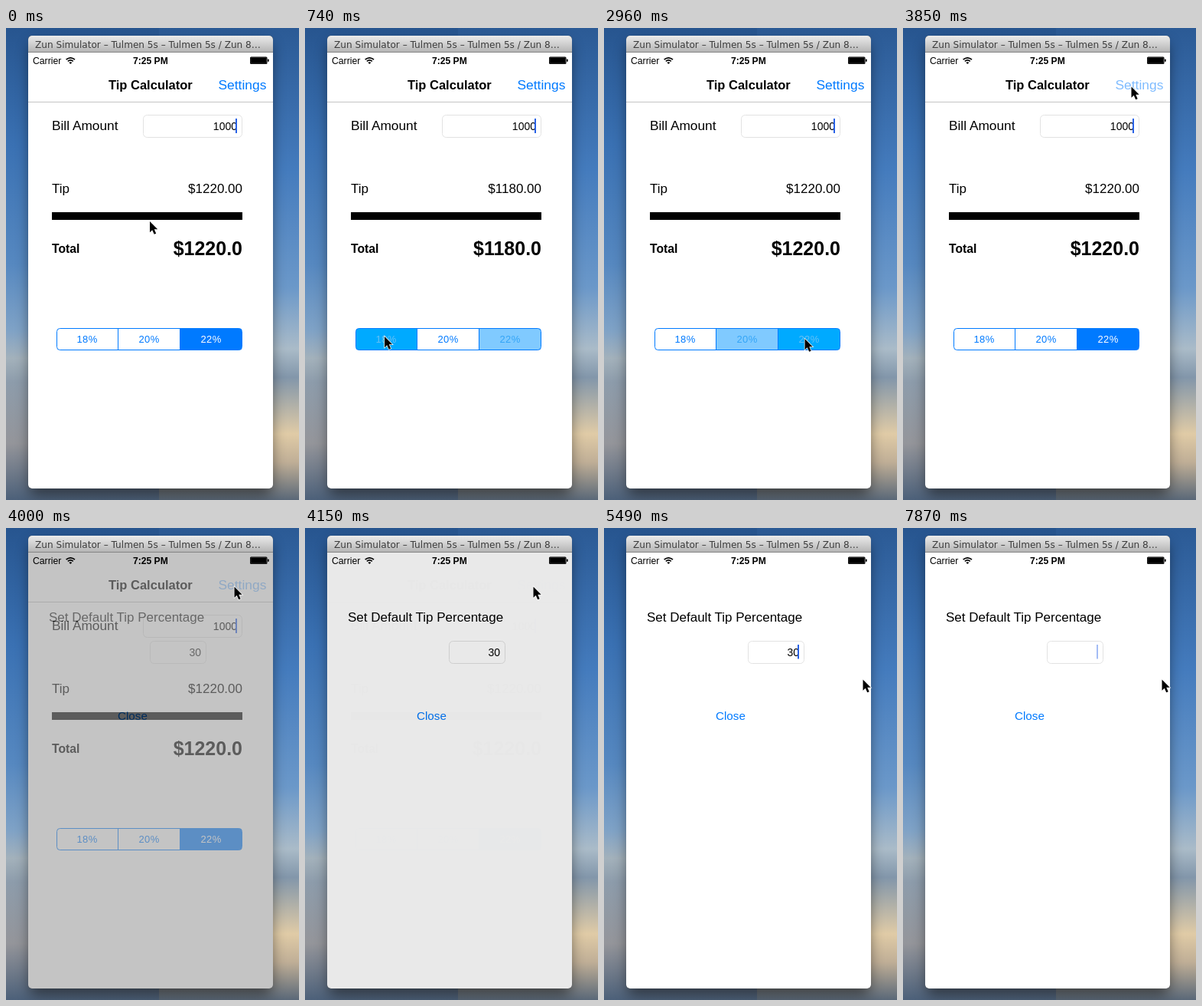
Recreate the animation shown at these times as an HTML page. Size 383 px wide and 615 px high, loop 8000 ms.

```html
<!DOCTYPE html>
<html lang="en">
<head>
<meta charset="utf-8">
<title>Tip Calculator</title>
<style>
html, body { margin: 0; width: 100%; height: 100%; overflow: hidden; background: #3f6fa8; }
svg { display: block; }
text { font: 17px "Liberation Sans", Arial, sans-serif; white-space: pre; }
.bold { font-weight: bold; }
.end { text-anchor: end; }
.link { fill: #007aff; }
.field { fill: #fff; stroke: #e2e2e2; }
.caret { fill: #2861e6; }
.small { font-size: 14px; }
.seg text { font-size: 13px; letter-spacing: .4px; text-anchor: middle; }
</style>
</head>
<body>
<svg width="383" height="615" viewBox="0 0 383 615">
  <defs>
    <linearGradient id="skyL" x2="0" y2="1">
      <stop offset="0" stop-color="#27558f"/>
      <stop offset=".25" stop-color="#3a71b3"/>
      <stop offset=".5" stop-color="#5688c0"/>
      <stop offset=".64" stop-color="#7fa2c6"/>
      <stop offset=".7" stop-color="#a3b1bb"/>
      <stop offset=".75" stop-color="#8d9cab"/>
      <stop offset=".88" stop-color="#94959a"/>
      <stop offset="1" stop-color="#4c6079"/>
    </linearGradient>
    <linearGradient id="skyR" x2="0" y2="1">
      <stop offset="0" stop-color="#2b5a95"/>
      <stop offset=".3" stop-color="#447bbd"/>
      <stop offset=".55" stop-color="#6b98c9"/>
      <stop offset=".68" stop-color="#aabbc8"/>
      <stop offset=".74" stop-color="#8296aa"/>
      <stop offset=".86" stop-color="#e0cba6"/>
      <stop offset=".92" stop-color="#bfae96"/>
      <stop offset="1" stop-color="#5a6878"/>
    </linearGradient>
    <linearGradient id="bar" x2="0" y2="1">
      <stop offset="0" stop-color="#ebebeb"/>
      <stop offset="1" stop-color="#b3b3b3"/>
    </linearGradient>
    <filter id="blur" x="-20%" y="-20%" width="140%" height="140%"><feGaussianBlur stdDeviation="9"/></filter>
    <clipPath id="frame"><rect x="29" y="10" width="320" height="590" rx="5"/></clipPath>
    <clipPath id="pill"><rect x="66.5" y="391.5" width="242" height="28" rx="4"/></clipPath>
  </defs>

  <rect width="200" height="615" fill="url(#skyL)"/>
  <rect x="200" width="183" height="615" fill="url(#skyR)"/>
  <rect x="31" y="20" width="316" height="588" rx="6" opacity=".5" filter="url(#blur)"/>

  <g clip-path="url(#frame)">
    <rect x="29" y="10" width="320" height="590"/>
    <rect x="29" y="10" width="320" height="22" fill="url(#bar)"/>
    <rect x="29" y="31" width="320" height="1" fill="#858585"/>
    <text x="38" y="25.5" fill="#3c3c3c" style="font:12.1px 'DejaVu Sans',sans-serif">Zun Simulator – Tulmen 5s – Tulmen 5s / Zun 8…</text>

    <g id="main">
      <rect x="29" y="32" width="320" height="568" fill="#fff"/>
      <rect x="29" y="96" width="320" height="1" fill="#c4c4c4"/>
      <text class="bold" x="134" y="80" style="font-size:16.5px">Tip Calculator</text>
      <text id="settings" class="link" x="277.5" y="80" style="font-size:17.4px">Settings</text>
      <text x="60" y="133" style="font-size:17.3px">Bill Amount</text>
      <rect class="field" x="179.5" y="113.5" width="129" height="29" rx="5"/>
      <text class="end small" x="302" y="133">1000</text>
      <rect id="caret1" class="caret" x="300" y="118" width="2" height="19"/>
      <text x="60" y="215">Tip</text>
      <text id="tip" class="end" x="309" y="215"></text>
      <rect x="60" y="240" width="249" height="10"/>
      <text class="bold" x="60" y="293" style="font-size:15.7px">Total</text>
      <text id="total" class="end bold" x="309" y="296" style="font-size:25px"></text>
      <g class="seg">
        <g id="segs" clip-path="url(#pill)"></g>
        <path d="M146.5 392v27M227.5 392v27" stroke="#007aff"/>
        <rect x="66.5" y="391.5" width="242" height="28" rx="4" fill="none" stroke="#007aff"/>
      </g>
    </g>

    <g id="prefs">
      <rect x="29" y="32" width="320" height="568" fill="#fff"/>
      <text x="56" y="122">Set Default Tip Percentage</text>
      <rect class="field" x="188.5" y="147.5" width="73" height="29" rx="5"/>
      <text id="percent" class="end small" x="255" y="167"></text>
      <rect id="caret2" class="caret" x="253" y="152" width="2" height="18.5"/>
      <text class="link" x="146" y="250" style="font-size:15.2px">Close</text>
    </g>

    <text x="35" y="46.5" style="font-size:12.2px">Carrier</text>
    <g fill="none" stroke="#000" stroke-width="1.7">
      <path d="M78.6 41.2q5.7-4.8 11.4 0M80.8 43.4q3.5-2.9 7 0"/>
      <path d="M84.3 47l-2-2q2-1.6 4 0z" fill="#000" stroke="none"/>
    </g>
    <text class="bold" x="166" y="46.5" style="font-size:12.1px">7:25 PM</text>
    <rect x="319" y="37.5" width="22.5" height="9.5" rx="1.5"/>
    <rect x="320" y="38.5" width="20.5" height="7.5" rx=".8" fill="none" stroke="#666" stroke-width=".4"/>
    <rect x="342" y="40.5" width="1.6" height="3.5" rx=".7"/>
  </g>

  <path id="pointer" d="M0 0V14.2L3.2 11.3 5.7 16.8 8.2 15.7 5.8 10.3H10.2Z" stroke="#fff" stroke-width="1.4" paint-order="stroke"/>
</svg>
<script>
const LOOP = 8000, TICK = 148.4, LEAD = 12;
const $ = id => document.getElementById(id);
const rates = [18, 20, 22];

// tick, x, y of the pointer tip
const path = [
  [0, 188, 252], [1, 182, 270], [4, 104, 402], [6, 104, 402], [8, 153, 407],
  [10, 181, 406], [12, 185.5, 406], [15, 185.5, 406], [18, 262.5, 405],
  [21, 262.5, 405], [25, 298, 80], [26, 298.5, 76.5], [30, 298.5, 76.5],
  [31, 262, 150], [32, 204, 212], [33, 237, 160], [35, 237, 160], [37, 338.5, 197.5]
];
// tick, chosen segment
const picks = [[-9, 2], [5, 0], [14, 1], [20, 2]];

const segs = rates.map((rate, i) => {
  const add = (tag, attrs) => {
    const el = document.createElementNS("http://www.w3.org/2000/svg", tag);
    for (const key in attrs) el.setAttribute(key, attrs[key]);
    return $("segs").appendChild(el);
  };
  const box = add("rect", { x: 66 + 80.5 * i, y: 391, width: 81, height: 29 });
  const label = add("text", { x: 106 + 81 * i, y: 410 });
  label.textContent = rate + "%";
  return { box, label };
});

function pointerAt(k) {
  const i = path.findIndex(p => p[0] > k);
  if (i < 0) return path[path.length - 1].slice(1);
  const a = path[i - 1], b = path[i];
  const f = (k - a[0]) / (b[0] - a[0]);
  return [1, 2].map(n => a[n] + (b[n] - a[n]) * f);
}

// fading caret: solid, half, gone, half over seven ticks
function blink(phase, solid) {
  const p = phase % 7;
  return p < solid ? 1 : p === solid || p === 6 ? .42 : 0;
}

function paintSegments(k) {
  let n = picks.length - 1;
  while (picks[n][0] > k) n--;
  const now = picks[n][1];
  const changing = picks[n][0] === k;
  const before = changing ? picks[n - 1][1] : -1;
  segs.forEach(({ box, label }, i) => {
    let look = ["#fff", "#007aff"];
    if (i === now) look = changing ? ["#00aaff", "#66c0f5"] : ["#007aff", "#fff"];
    else if (i === before) look = ["#80caff", "#33a5f7"];
    box.setAttribute("fill", look[0]);
    label.setAttribute("fill", look[1]);
  });
  const sum = "$" + (1000 + rates[now] * 10);
  $("tip").textContent = sum + ".00";
  $("total").textContent = sum + ".0";
}

function draw(time) {
  const k = Math.floor((time % LOOP + LEAD) / TICK);
  const fade = k < 27 ? 0 : k === 27 ? .36 : k === 28 ? .905 : 1;
  $("main").setAttribute("opacity", 1 - fade);
  $("prefs").setAttribute("opacity", fade);
  $("settings").setAttribute("opacity", k >= 26 ? .5 : 1);
  $("caret1").setAttribute("opacity", blink(k + 3, 4));
  $("caret2").setAttribute("opacity", k < 35 ? 0 : k < 46 ? 1 : blink(k - 43, 3));
  $("percent").textContent = k < 40 ? "30" : k < 42 ? "3" : "";
  paintSegments(k);
  $("pointer").setAttribute("transform", `translate(${pointerAt(k)})`);
}

const start = performance.now();
function loop() {
  draw(performance.now() - start);
  requestAnimationFrame(loop);
}
loop();
</script>
</body>
</html>
```
